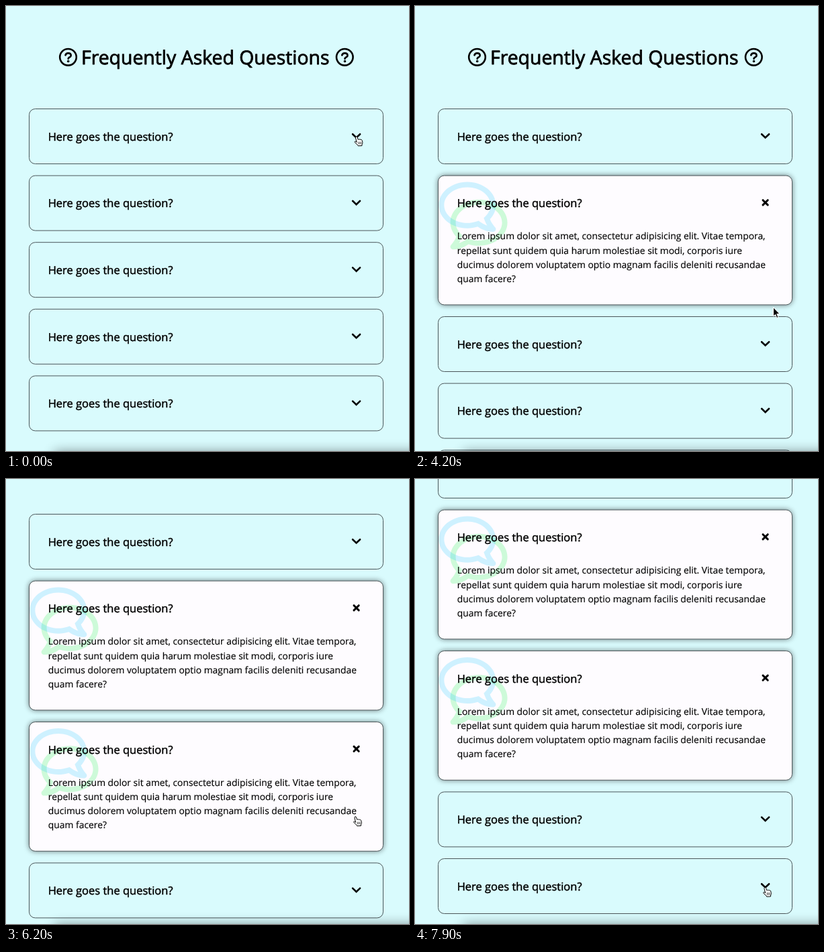
These frames come from a looping animation (600x664 px, 8000 ms). An HTML page:

```html
<!DOCTYPE html>
<html lang="en">
<head>
<meta charset="utf-8">
<title>Frequently Asked Questions</title>
<style>
  html, body { margin: 0; width: 100%; height: 100%; overflow: hidden; background: #d9fbfd; }
  svg { display: block; width: 600px; height: 664px; }
  text {
    font-family: "Open Sans", "Noto Sans", sans-serif;
    stroke: #000; stroke-linejoin: round; text-rendering: geometricPrecision;
  }
  .title { font-size: 28.4px; stroke-width: .8px; }
  .question { font-size: 16.5px; stroke-width: .45px; }
  .answer { font-size: 13.87px; stroke-width: .15px; }
  .line { fill: none; stroke: #000; }
</style>
</head>
<body>
<svg id="stage" viewBox="0 0 600 664">
  <defs>
    <g id="help">
      <circle r="12.3" class="line" stroke-width="2.6"/>
      <path class="line" stroke-width="2.7" stroke-linecap="round"
        d="M-4 -2.9Q-3.2 -6 .1 -6Q4.2 -6 4.2 -2.6Q4.2 -.8 2 .3Q.2 1.1 .2 2.4"/>
      <circle cx=".2" cy="6.2" r="1.8"/>
    </g>
    <path id="bubble" d="M256 32C114.6 32 0 125.1 0 240c0 47.6 19.9 91.2 52.9 126.3C38 405.7 7 439.1 6.5 439.5c-6.6 7-8.4 17.2-4.6 26S14.4 480 24 480c61.5 0 110-25.7 139.1-46.3C192 442.8 223.2 448 256 448c141.4 0 256-93.1 256-208S397.4 32 256 32zm0 368c-26.7 0-53.1-4.1-78.4-12.1l-22.7-7.2-19.5 13.8c-14.3 10.1-33.9 21.4-57.5 29 7.3-12.1 14.4-25.7 19.9-40.2l10.6-28.1-20.6-21.8C69.7 314.1 48 282.2 48 240c0-88.2 93.3-160 208-160s208 71.8 208 160-93.3 160-208 160z"/>
    <filter id="soft" x="-20%" y="-200%" width="140%" height="500%">
      <feGaussianBlur stdDeviation="9"/>
    </filter>
  </defs>
  <rect width="600" height="664" fill="#d9fbfd"/>
  <g id="page">
    <use href="#help" x="92.5" y="76.3"/>
    <text class="title" x="112" y="86.6">Frequently Asked Questions</text>
    <use href="#help" x="504.3" y="76.3"/>
  </g>
  <rect x="72" y="665" width="640" height="60" fill="#000" opacity=".42" filter="url(#soft)"/>
  <g id="cursor" stroke-linejoin="round" stroke-linecap="round">
    <g id="hand" transform="translate(-3 -.7)" stroke="#000" stroke-width="1">
      <path fill="#fff" d="M3.6 9L2 3Q1.7 1 3 .7Q4.2 .6 4.6 2L5.6 5.2Q6.6 4.4 7.6 5.2Q8.6 4.5 9.6 5.4Q10.9 4.9 11.5 6.2L12.3 9Q12.6 11 11.6 12.6L11.4 14.5L5.6 14.7L5.2 13.5L1 9.6Q.2 8.5 1.2 8Q2.4 7.8 3.6 9Z"/>
      <path fill="none" stroke-width=".7" d="M6.3 9v3M8.2 9v3M10.1 9v3"/>
    </g>
    <path id="arrow" fill="#000" stroke="#fff" stroke-width="1"
      d="M0 0V13L3 10.3L5.2 15.4L7.4 14.4L5.2 9.5H9.2Z"/>
  </g>
</svg>
<script>
const LOOP = 8000, FADE = 800;
const TOP = 153.5, CLOSED = 82, OPEN = 192.8, GAP = 17.6;
const BACK = [217, 251, 253], WHITE = [254, 252, 255];
const ANSWER = [
  "Lorem ipsum dolor sit amet, consectetur adipisicing elit. Vitae tempora,",
  "repellat sunt quidem quia harum molestiae sit modi, corporis iure",
  "ducimus dolorem voluptatem optio magnam facilis deleniti recusandae",
  "quam facere?"
];
// opening and closing time of each card
const TIMES = [[600, 2000], [3400, Infinity], [5300, Infinity], null, null];
// pointer path: time, x, y
const PATH = [
  [0, 521.5, 194.7], [2450, 521.5, 194.7], [3000, 521.5, 294.2],
  [3850, 521.5, 294.2], [4200, 533.5, 450], [4800, 520, 503.7],
  [7480, 520, 503.7], [7850, 521, 609.2]
];
const BUTTONS = [194.7, 294.2, 503.7, 609.2];

const $ = id => document.getElementById(id);
const clamp = v => Math.min(1, Math.max(0, v));
const show = (el, on) => el.setAttribute("visibility", on ? "inherit" : "hidden");

function add(parent, tag, attrs, text) {
  const el = document.createElementNS("http://www.w3.org/2000/svg", tag);
  for (const k in attrs) el.setAttribute(k, attrs[k]);
  if (text) el.textContent = text;
  parent.appendChild(el);
  return el;
}

// CSS "ease": cubic-bezier(.25, .1, .25, 1)
function ease(x) {
  if (x <= 0 || x >= 1) return clamp(x);
  let lo = 0, hi = 1, u;
  for (let i = 0; i < 20; i++) {
    u = (lo + hi) / 2;
    if (.75 * u * (1 - u) + u ** 3 < x) lo = u; else hi = u;
  }
  return .3 * u * (1 - u) ** 2 + 3 * u * u * (1 - u) + u ** 3;
}

function makeCard() {
  const root = add($("page"), "g");
  const box = { x: 34.5, y: 0, width: 527, rx: 9 };
  const shadow = add(root, "rect", box);
  const panel = add(root, "rect", { ...box, stroke: "#4b5659", "stroke-width": 1 });
  const body = add(root, "g");
  add(body, "use", { href: "#bubble", fill: "#0cf040", opacity: .2, transform: "translate(52.6 30.4) scale(.166)" });
  add(body, "use", { href: "#bubble", fill: "#00c0ff", opacity: .19, transform: "translate(120.4 4.2) scale(-.166 .166)" });
  ANSWER.forEach((s, i) => add(body, "text", { class: "answer", x: 62.8, y: 95.4 + 21.1 * i }, s));
  add(root, "text", { class: "question", x: 62.7, y: 47.3 }, "Here goes the question?");
  const mark = { class: "line", "stroke-linecap": "round" };
  const chevron = add(root, "path", { ...mark, "stroke-width": 2.6, d: "M516.1 37.7l5.5 5.3 5.5-5.3" });
  const cross = add(root, "path", { ...mark, "stroke-width": 3, d: "M518 36.6l7.2 7.2M525.2 36.6l-7.2 7.2" });
  return { root, shadow, panel, body, chevron, cross };
}

const cards = TIMES.map(makeCard);

function fade(span, t) {
  if (!span || t < span[0]) return 0;
  return t < span[1] ? ease((t - span[0]) / FADE) : 1 - ease((t - span[1]) / FADE);
}

function drawCards(t) {
  let y = TOP;
  cards.forEach((c, i) => {
    const span = TIMES[i], open = !!span && t >= span[0] && t < span[1];
    const p = fade(span, t), h = open ? OPEN : CLOSED;
    c.root.setAttribute("transform", `translate(0 ${y.toFixed(2)})`);
    c.panel.setAttribute("height", h);
    c.panel.setAttribute("fill", `rgb(${BACK.map((b, k) => Math.round(b + (WHITE[k] - b) * p))})`);
    c.shadow.setAttribute("height", h);
    c.shadow.setAttribute("opacity", .55 * p);
    c.shadow.style.filter = p ? `blur(${(4 * p).toFixed(2)}px)` : "none";
    show(c.shadow, p > 0);
    show(c.body, open);
    show(c.cross, open);
    show(c.chevron, !open);
    y += h + GAP;
  });
}

function drawCursor(t) {
  let i = PATH.length - 1;
  while (t < PATH[i][0]) i--;
  const a = PATH[i], b = PATH[i + 1] || a;
  const u = b === a ? 0 : (t - a[0]) / (b[0] - a[0]);
  const s = u * u * (3 - 2 * u);
  const x = a[1] + (b[1] - a[1]) * s, y = a[2] + (b[2] - a[2]) * s;
  const over = BUTTONS.some(v => Math.abs(v - y) < 12);
  $("cursor").setAttribute("transform", `translate(${x.toFixed(1)} ${y.toFixed(1)})`);
  show($("hand"), over);
  show($("arrow"), !over);
}

function draw(t) {
  drawCards(t);
  const scroll = 207 * (1 - (1 - clamp((t - 5700) / 1720)) ** 1.95);
  $("page").setAttribute("transform", `translate(0 ${-Math.round(scroll)})`);
  drawCursor(t);
}

const start = performance.now();
function tick() {
  draw((performance.now() - start) % LOOP);
  requestAnimationFrame(tick);
}
tick();
</script>
</body>
</html>
```
